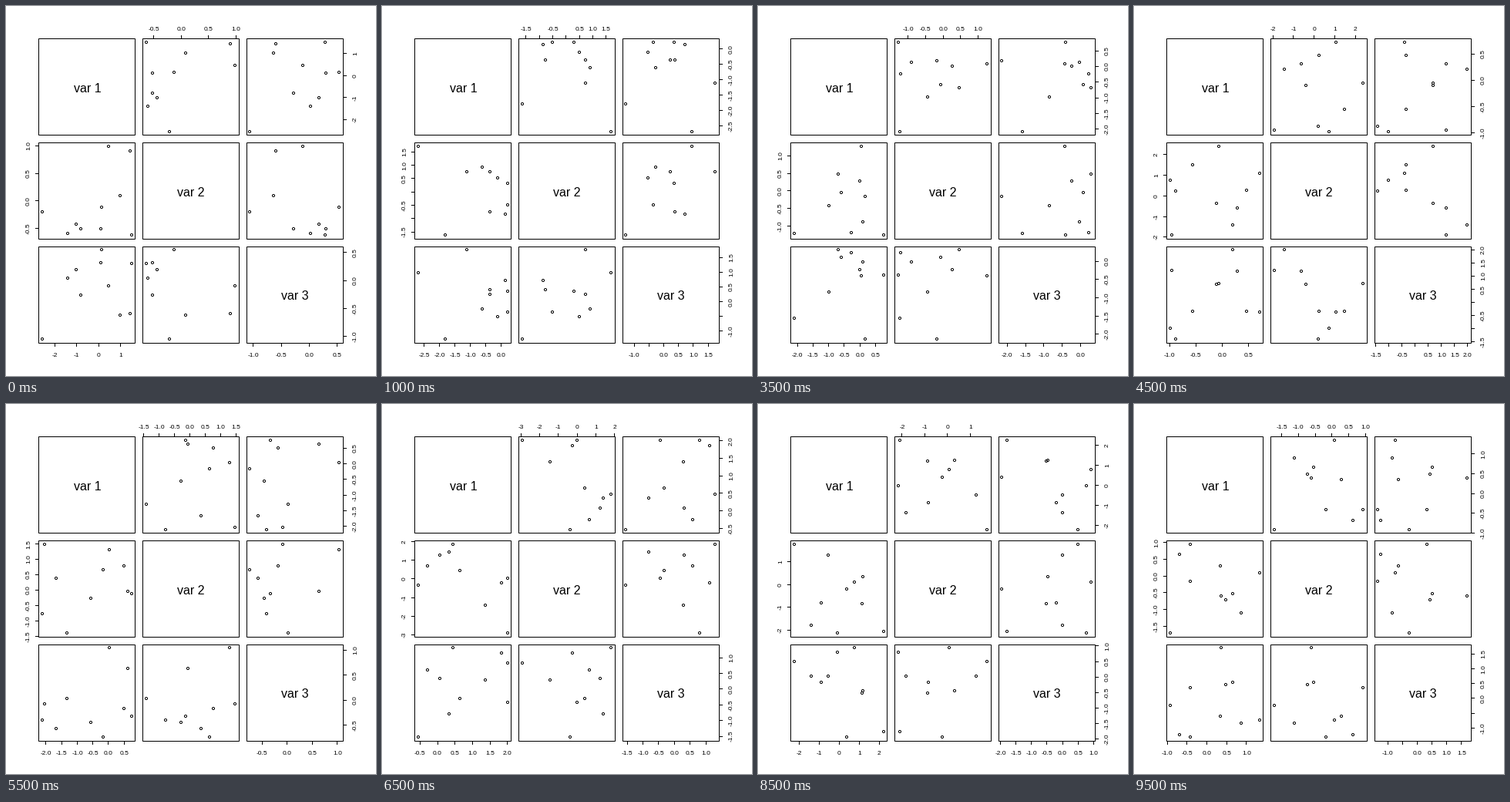
A matplotlib script that plays this animation: 480x480 px, repeating every 10 s.

```python
import math

import numpy as np
import matplotlib.pyplot as plt
from matplotlib.animation import FuncAnimation
from matplotlib.patches import Circle, Rectangle

STAGE = 480
DPI = 80
PX = 72 / DPI                     # one pixel in points
FRAMES, INTERVAL = 20, 500
POINTS = 10
DEVIATION = (1.1, 0.95, 0.85)     # spread of each variable
FONT = "Liberation Sans"

# Margins of a 3 x 3 scatterplot matrix, in text lines
LINE = 9.504
OUTER, GAP = 4 * LINE, LINE
PITCH = (STAGE - 2 * OUTER) / 3
SIZE = PITCH - GAP
STARTS = [OUTER + GAP / 2 + k * PITCH for k in range(3)]
LABEL_GAP = 5.9

# side: (variables, tick start, tick end, label baseline)
SIDES = {
    "bottom": ((0, 2), 438, 442, 455),
    "top": ((1,), 42, 38, 32),
    "left": ((1,), 42, 38, 31),
    "right": ((0, 2), 438, 442, 455),
}


def sample(i):
    """A fresh normal sample of the three variables for each step."""
    return np.random.default_rng(i).normal(0, DEVIATION, (POINTS, 3)).T


def limits(values):
    pad = 0.04 * np.ptp(values)
    return values.min() - pad, values.max() + pad


def ticks(low, high):
    """Round tick values inside the limits, and their label format."""
    cell = (high - low) / 5
    steps = ((0.2, 0.311), (0.5, 0.777), (1, 1.556), (2, math.inf))
    step = next(s for s, top in steps if cell < top)
    first, last = math.ceil(low / step), math.floor(high / step)
    return [k * step for k in range(first, last + 1)], "%.0f" if step >= 1 else "%.1f"


def label_width(text):
    return sum({"-": 3.3, ".": 2}.get(c, 4) for c in text)


fig = plt.figure(figsize=(STAGE / DPI, STAGE / DPI), dpi=DPI, facecolor="white")
ax = fig.add_axes([0, 0, 1, 1])
ax.set_xlim(0, STAGE)
ax.set_ylim(STAGE, 0)
ax.axis("off")

for row, top in enumerate(STARTS):
    for left in STARTS:
        ax.add_patch(Rectangle((int(left) + 0.5, int(top) + 0.5), 125, 125,
                               fill=False, ec="black", lw=PX, snap=False))
    middle = top + SIZE / 2
    ax.text(middle, middle + 6.7, f"var {row + 1}", family=FONT, size=16 * PX,
            ha="center", va="baseline")

moving = []


def draw_axis(side, var, low, high):
    _, inner, outer, base = SIDES[side]
    upright = side in ("left", "right")
    values, fmt = ticks(low, high)
    free_from = -math.inf
    for value in values:
        along = (value - low) / (high - low) * SIZE
        pos = STARTS[var] + (SIZE - along if upright else along)
        pixel = int(pos) + 0.5
        xs, ys = [pixel, pixel], [inner, outer]
        if upright:
            xs, ys = ys, xs
        moving.extend(ax.plot(xs, ys, color="black", lw=PX, snap=False,
                              solid_capstyle="butt"))
        text = fmt % value
        half = label_width(text) / 2
        if along - half < free_from:      # would crowd the previous label
            continue
        free_from = along + half + LABEL_GAP
        x, y = (base, pos) if upright else (pos, base)
        moving.append(ax.text(x, y, text, family=FONT, size=8.4 * PX, ha="center",
                              va="baseline", rotation=90 if upright else 0,
                              rotation_mode="anchor"))


def update(i):
    while moving:
        moving.pop().remove()
    data = sample(i)
    bounds = [limits(v) for v in data]
    unit = [(v - lo) / (hi - lo) * SIZE for v, (lo, hi) in zip(data, bounds)]
    for row in range(3):
        for col in range(3):
            if row == col:
                continue
            for u, v in zip(unit[col], unit[row]):
                centre = int(STARTS[col] + u), int(STARTS[row] + SIZE - v)
                moving.append(ax.add_patch(Circle(centre, 1.55, fill=False,
                                                  ec="black", lw=PX)))
    for side, (variables, *_) in SIDES.items():
        for var in variables:
            draw_axis(side, var, *bounds[var])
    return moving


anim = FuncAnimation(fig, update, frames=FRAMES, interval=INTERVAL,
                     init_func=lambda: [], repeat=True, repeat_delay=0, blit=False)
plt.show()
```
